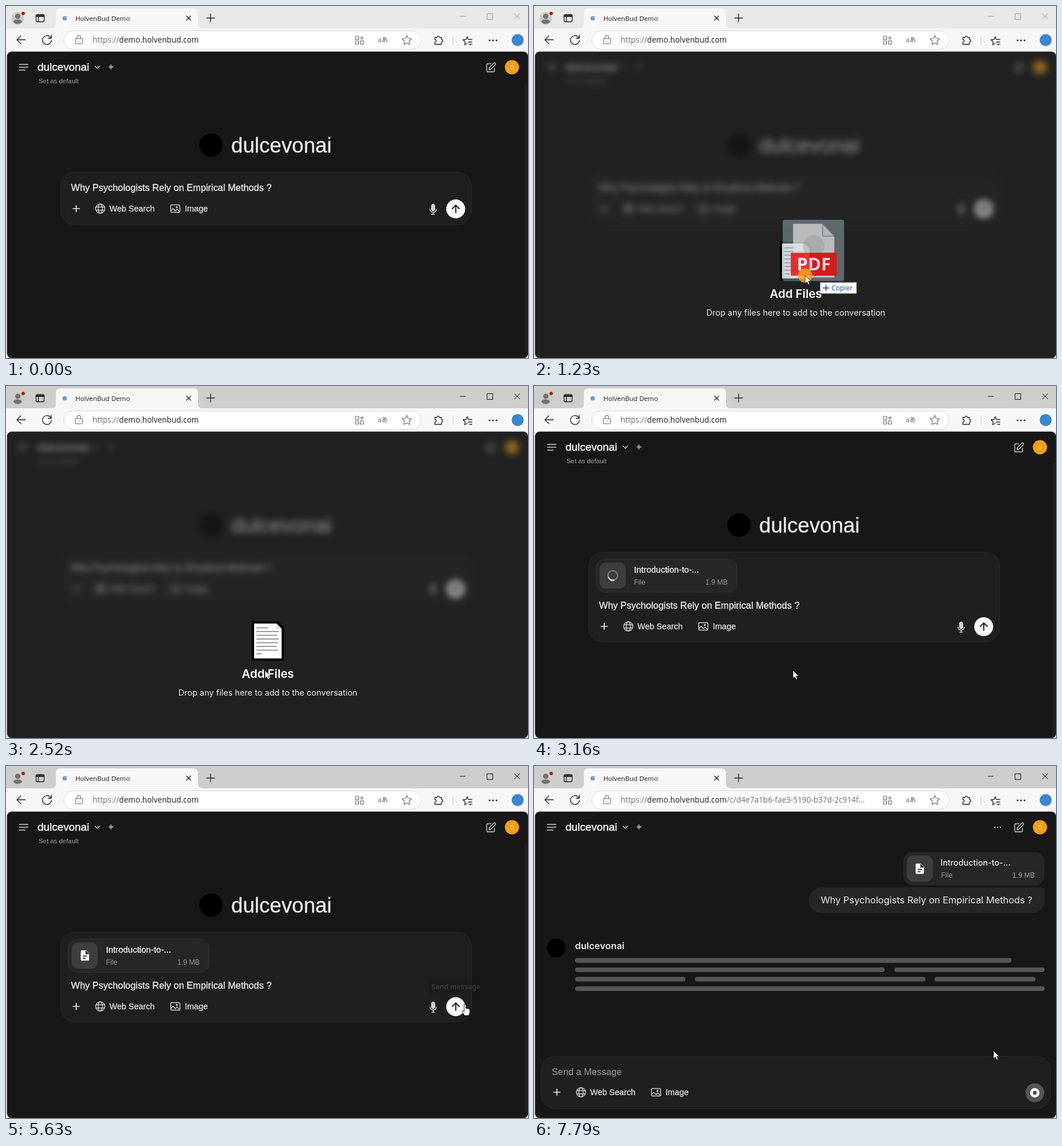
Recreate the animation shown at these times as an HTML page. Size 911 by 615 pixels, loop 8000 ms.

```html
<!DOCTYPE html>
<html lang="en">
<head>
<meta charset="utf-8">
<title>Chat file upload</title>
<style>
  html, body { margin: 0; width: 100%; height: 100%; overflow: hidden; background: #f7f7f7; }
  svg { display: block; width: 100%; height: 100%; }
  text { font-family: "Liberation Sans", Arial, sans-serif; fill: #ececec; white-space: pre; }
  .inter { font-family: Inter, sans-serif; }
  .ui { font-family: "Open Sans", "Noto Sans", sans-serif; fill: #1b1b1b; }
  .medium { stroke: #ececec; stroke-width: .35; }
  .strong { stroke: #ececec; stroke-width: .6; }
  .soft { fill: #d0d0d0; stroke: #d0d0d0; stroke-width: .45; }
  .muted { fill: #9b9b9b; }
  .line { fill: none; stroke: #d0d0d0; stroke-width: 1.4; stroke-linecap: round; stroke-linejoin: round; }
  .dark { stroke: #222; stroke-width: 1.3; }
  .grey { stroke: #666; stroke-width: 1.1; }
  .bright { stroke: #ececec; stroke-width: 1.7; }
  .panel { fill: #1f1f1f; stroke: #2a2a2a; }
</style>
</head>
<body>
<svg viewBox="0 0 911 615">
  <defs>
    <clipPath id="pageClip"><rect x="2" y="80" width="909" height="535" rx="8"/></clipPath>
    <g id="tools">
      <path class="line bright" d="M117 354h11M122.500 348.500v11"/>
      <g class="line" transform="translate(164.500 354)">
        <circle r="8"/><ellipse rx="3.700" ry="8"/><path d="M-7.400-2.700H7.400M-7.400 2.700H7.400"/>
      </g>
      <text class="soft" x="180.500" y="359" font-size="14.400">Web Search</text>
      <g class="line" transform="translate(295.500 354)">
        <rect x="-8" y="-6.500" width="16" height="13" rx="1.500"/>
        <path d="M-8 4l4-4 4 4 3-3 5 5"/><circle cx="2.500" cy="-2.500" r="1"/>
      </g>
      <text class="soft" x="312" y="359" font-size="14.500">Image</text>
    </g>
    <g id="card">
      <rect x=".5" y=".5" width="246" height="58" rx="16" fill="#262626"/>
      <rect x="6.500" y="6.500" width="45.500" height="45.500" rx="11" fill="#3d3d3d"/>
      <text class="muted" x="66.500" y="45" font-size="12.400">File</text>
      <text class="muted" x="230" y="45" font-size="12.300" text-anchor="end">1.9 MB</text>
    </g>
    <g id="doc">
      <path fill="#fff" d="M-5.500-9H2L7.500-3.500V7.500A1.500 1.500 0 0 1 6 9H-5.500A1.500 1.500 0 0 1-7 7.500v-15A1.500 1.500 0 0 1-5.500-9z"/>
      <path stroke="#3d3d3d" stroke-width="1.800" d="M-3.500 1H4M-3.500 5H1.500M2-8V-3H7"/>
    </g>
  </defs>

  <!-- browser frame -->
  <rect id="titleBar" width="911" height="40"/>
  <path fill="#f7f7f7" d="M0 39H79q8 0 8-8V12q0-8 8-8H327q8 0 8 8V31q0 8 8 8H911V90H0z"/>
  <circle cx="20.500" cy="21.500" r="11" fill="#cdcac7"/>
  <circle cx="20.500" cy="18" r="4.500" fill="#77706b"/>
  <path fill="#77706b" d="M13 28q0-4.500 7.500-4.500T28 28q-7.500 7-15 0z"/>
  <circle cx="30" cy="13" r="3" fill="#a3200d"/>
  <g class="line dark">
    <rect x="52.500" y="15" width="14" height="12.500" rx="2"/>
    <path d="M53 17.500H66" stroke-width="3"/><path d="M56.500 17V27"/>
    <path d="M315 17.500l7.500 7.500m0-7.500l-7.500 7.500M350 21H364M357 14V28"/>
    <path d="M34 59H19M26 52l-7 7 7 7"/>
    <path d="M78.500 56A7.800 7.800 0 1 0 79.300 60M79 51V56.500H73.500"/>
    <path d="M748.500 55h3.500a2.300 2.300 0 1 1 4.600 0H760V58.500a2.300 2.300 0 1 1 0 4.600V67H748.500V63a2.300 2.300 0 1 0 0-4.600z"/>
    <path d="M807 58.500l-2-5-2.300 5-5.200.5 4 3.700-1.200 5 4.700-2.500M808 58.500h5M807 63h6M809 67h4"/>
  </g>
  <circle cx="102.500" cy="21.500" r="4" fill="#7d9cc4"/>
  <text class="ui" x="121" y="25.500" font-size="11.600">HolvenBud Demo</text>
  <path id="winButtons" fill="none" d="M792 18H802M839.500 13.500h10v10h-10zM887 13l10 10m0-10l-10 10"/>
  <rect x="101" y="43.500" width="623.500" height="32" rx="16" fill="#fff" stroke="#d8d8d8"/>
  <g class="line grey">
    <rect x="121" y="57" width="12.500" height="9" rx="1.500"/><path d="M124 57V54.500a3.200 3.200 0 0 1 6.400 0V57M127.200 61v1"/>
    <path d="M610 53h5.500v5.500H610zM610 61h5.500v5.500H610zM618.500 61H624v5.500H618.500zM621 52.500v6.500M617.800 55.800h6.400"/>
    <path d="M699.500 51.500l2.500 5.300 5.600.7-4.100 4 1 5.700-5-2.800-5 2.800 1-5.700-4.100-4 5.600-.7z"/>
  </g>
  <text class="ui" x="649" y="63" font-size="11" style="font-family:'Noto Sans CJK JP','Noto Sans CJK',sans-serif;fill:#555">aあ</text>
  <path stroke="#ccc" d="M780 52V68"/>
  <g fill="#222"><circle cx="844" cy="60" r="1.500"/><circle cx="850" cy="60" r="1.500"/><circle cx="856" cy="60" r="1.500"/></g>
  <circle cx="893" cy="59.500" r="10.500" fill="#3b86d0"/>
  <text class="ui" x="151" y="64" font-size="13.600"><tspan fill="#6b6b6b">https://</tspan>demo.holvenbud.com<tspan id="urlPath" fill="#6b6b6b">/c/d4e7a1b6-fae3-5190-b37d-2c914f...</tspan></text>

  <!-- web page -->
  <rect x="1.500" y="79.500" width="910" height="536" rx="8.500" fill="none" stroke="#aaa"/>
  <g clip-path="url(#pageClip)">
    <rect x="2" y="80" width="909" height="535" fill="#171717"/>
    <g id="content">
      <path class="line" d="M23.500 102H38.500M23.500 107H38.500M23.500 112H33.500"/>
      <text class="strong" x="55" y="113" font-size="18.900">dulcevonai</text>
      <path class="line" d="M155.500 105l4 4 4-4M179.500 106.500h7.500M183.250 102.750v7.500"/>
      <g class="line" transform="translate(846 107)">
        <path d="M-.5-6H-5a2 2 0 0 0-2 2V6a2 2 0 0 0 2 2H4.500a2 2 0 0 0 2-2V1.500"/>
        <path d="M-3 4l.7-3.500 7.500-7.500a1.900 1.900 0 0 1 2.700 2.700L.4 3.300z"/>
      </g>
      <circle cx="883" cy="107" r="12.400" fill="#f59d12"/>
      <text class="inter" x="883" y="110.500" font-size="9.500" text-anchor="middle">D</text>

      <g id="home">
        <rect x="905" y="135" width="6" height="480" fill="#1e1e1e"/>
        <text class="muted" x="57" y="134.500" font-size="11.400">Set as default</text>
        <circle cx="358" cy="243" r="20.500"/>
        <text class="medium" x="393" y="256" font-size="36.700">dulcevonai</text>
        <rect id="composer" class="panel" x="95.500" y="290.500" width="717" rx="24"/>
        <g id="attachment">
          <use href="#card" x="108" y="302"/>
          <rect x="108.500" y="302.500" width="246" height="58" rx="16" fill="none" stroke="#323232"/>
          <text class="medium" x="174.500" y="326" font-size="15">Introduction-to-...</text>
          <use id="ready" href="#doc" x="137.500" y="331"/>
          <g id="spinner" fill="none" stroke-width="2.500">
            <circle r="8.300" stroke="#777"/><path stroke="#e8e8e8" d="M8.300 0A8.300 8.300 0 0 1 0 8.300"/>
          </g>
        </g>
        <g id="controls">
          <text class="medium" x="113.500" y="323" font-size="16.360">Why Psychologists Rely on Empirical Methods ?</text>
          <path id="caret" stroke="#ececec" d="M463.500 310V326.500"/>
          <use href="#tools"/>
          <g class="line" transform="translate(745.500 355)">
            <rect x="-2.800" y="-8.500" width="5.600" height="11.500" rx="2.800" fill="#d0d0d0"/>
            <path d="M-5.500 0a5.500 5.500 0 0 0 11 0M0 5.500V9M-2.500 9h5"/>
          </g>
          <circle cx="784.800" cy="354.500" r="16.500" fill="#fff"/>
          <path class="line dark" style="stroke-width:2" d="M785 361V348.500M779 354l6-6 6 6"/>
        </g>
        <g id="tooltip">
          <rect x="733" y="373" width="95" height="26" rx="6" fill="#0f0f0f"/>
          <text class="inter" x="785" y="390" font-size="12.300" text-anchor="middle">Send message</text>
        </g>
      </g>

      <g id="chat">
        <g fill="#d0d0d0"><circle cx="804" cy="107" r="1.300"/><circle cx="809" cy="107" r="1.300"/><circle cx="814" cy="107" r="1.300"/></g>
        <use href="#card" x="644" y="150"/>
        <use href="#doc" x="673" y="179.500"/>
        <text class="inter" x="709.500" y="174" font-size="14.300" font-weight="500">Introduction-to-...</text>
        <path fill="#262626" d="M502 212H885q6 0 6 6V235a22 22 0 0 1-22 22H502a22.500 22.500 0 0 1 0-45z"/>
        <text class="inter" x="500.500" y="240" font-size="16.360">Why Psychologists Rely on Empirical Methods ?</text>
        <circle cx="38.800" cy="317.800" r="16.400"/>
        <text class="inter" x="71.500" y="320" font-size="16.360" font-weight="600">dulcevonai</text>
        <path fill="none" stroke="#575757" stroke-width="8.200" stroke-linecap="round"
          d="M76 339.700H829M76 356H608M633 356H887M76 372.500H260M285 372.500H679M703 372.500H871M76 389H887"/>
        <rect class="panel" x="12.500" y="507.500" width="889" height="91" rx="24"/>
        <text class="muted" x="31" y="540" font-size="16.300">Send a Message</text>
        <use href="#tools" x="-82.500" y="216"/>
        <circle cx="874" cy="571" r="16.500" fill="#555"/>
        <circle cx="874" cy="571" r="8.300" fill="#fff"/>
        <rect x="871" y="568" width="6" height="6" rx="1" fill="#444"/>
      </g>
    </g>

    <g id="dropZone">
      <rect x="2" y="80" width="909" height="535" fill="#303030" opacity=".45"/>
      <path d="M429 411H475L485 421V480H429z"/>
      <path fill="#fff" d="M433 415H472L481 424V476H433z"/>
      <path fill="#ddd" d="M472 415V424H481z"/>
      <path stroke="#999" stroke-width="2" d="M437 422.500h20M437 429h39M437 435.500h36M437 442h39M437 448.500h38M437 455h35M437 461.500h38M437 468h9"/>
      <text class="inter" x="457" y="509.500" font-size="20.400" font-weight="600" text-anchor="middle" style="fill:#fff">Add Files</text>
      <text class="inter" x="457" y="541" font-size="14.500" text-anchor="middle">Drop any files here to add to the conversation</text>
    </g>
  </g>

  <!-- pointer and dragged file -->
  <g id="dragged">
    <g opacity=".9">
      <rect x=".5" y=".5" width="106" height="106" rx="2" fill="#9db0b9" fill-opacity=".55" stroke="#70899a" stroke-opacity=".7"/>
      <path fill="#dcdee0" fill-opacity=".85" d="M18 7H70L90 28V101H18z"/>
      <path fill="#c3c7ca" stroke="#5d676d" d="M69.500 7.500V28.500H90z"/>
      <circle cx="54" cy="46" r="19" fill="#b2b7bb" fill-opacity=".8"/>
      <rect x="14" y="57.500" width="80" height="40" fill="#e8181e"/>
      <text class="ui" x="54" y="88.500" font-size="31" font-weight="700" text-anchor="middle" style="fill:#f6eeee">PDF</text>
    </g>
    <rect x="65.500" y="109.500" width="63" height="19" fill="#fff" stroke="#aaa"/>
    <path stroke="#2444a0" stroke-width="1.600" d="M70 119h11M75.500 113.500v11"/>
    <text class="ui" x="85" y="123.500" font-size="12" style="fill:#2444a0">Copier</text>
  </g>
  <g id="pointer">
    <circle id="press" r="12.500" fill="#f9a514" opacity=".82"/>
    <path id="arrow" fill="#fff" stroke="#111" stroke-width=".8" d="M0 0V14L3.200 11 5.500 16 7.800 15 5.500 10H10z"/>
    <path id="hand" fill="#fff" stroke="#111" stroke-width=".9" d="M-1.500 0q1.500-1.500 3 0V6.500q1.500-1 2.500.5 1.500-.8 2.300.6Q8.500 7 8.500 9v5L6.500 19H-1L-5 12q0-2 1.500-1.500L-1.500 12z"/>
  </g>
</svg>
<script>
const LOOP = 8000, DRAG = 500, DROP = 2120, FOCUS = 2320, ATTACHED = 2610,
      UPLOADED = 4550, HOVER = 5450, CLICK = 6050, SENT = 6190, URL_CHANGE = 6400, BLINK = 530;

// each key: time, x, y
const filePath = [[800, 527, 303], [900, 512, 347], [1150, 445, 370], [1510, 397, 386],
  [1640, 397, 386], [1770, 397.5, 388], [1990, 397.5, 388], [2060, 399, 402]];
const pointerPath = [[800, 580, 398], [900, 537, 432], [1150, 480, 468], [1510, 450, 481],
  [1640, 450, 481], [1770, 450, 483], [1990, 450, 483], [2060, 452, 497],
  [3650, 452, 497], [3930, 543, 484], [4140, 654, 455], [4480, 719, 430],
  [5220, 719, 430], [5500, 801, 417], [SENT, 801, 417], [6500, 625, 377],
  [7600, 625, 377], [7790, 802, 497.5]];

const el = Object.fromEntries([...document.querySelectorAll('svg [id]')].map(e => [e.id, e]));
const show = (id, on) => { el[id].style.display = on ? '' : 'none'; };
const place = (id, [x, y], turn = 0) =>
  el[id].setAttribute('transform', `translate(${x} ${y}) rotate(${turn})`);
const clamp = v => Math.min(1, Math.max(0, v));

function along(path, t) {
  const next = path.findIndex(key => key[0] > t);
  if (next === 0) return path[0].slice(1);
  if (next < 0) return path[path.length - 1].slice(1);
  const [t0, x0, y0] = path[next - 1], [t1, x1, y1] = path[next];
  const k = (t - t0) / (t1 - t0);
  return [x0 + (x1 - x0) * k, y0 + (y1 - y0) * k];
}

function draw(now) {
  const t = now % LOOP;
  const active = t >= FOCUS, attached = t >= ATTACHED, sent = t >= SENT;
  const dropping = t >= DRAG && !attached;
  const dragging = t >= DRAG + 70 && t < DROP;
  const hovering = t >= HOVER && !sent;

  el.titleBar.setAttribute('fill', active ? '#cdcdcd' : '#e8e8e8');
  el.winButtons.setAttribute('stroke', active ? '#111' : '#999');
  show('urlPath', t >= URL_CHANGE);

  show('home', !sent);
  show('chat', sent);
  show('dropZone', dropping);
  el.content.style.filter = dropping ? 'blur(6px) brightness(.9)' : 'none';

  el.composer.setAttribute('height', attached ? 156.5 : 91.5);
  place('controls', [0, attached ? 66 : 0]);
  show('attachment', attached);
  show('ready', t >= UPLOADED);
  show('spinner', t < UPLOADED);
  place('spinner', [137.5, 331], 180 + (t - 4140) * 360 / 750);
  show('caret', attached && Math.floor((t - 3630) / BLINK) % 2 === 0);
  el.tooltip.style.opacity = clamp((t - 5580) / 300);

  show('dragged', dragging);
  place('dragged', along(filePath, t));
  show('pointer', t >= DRAG + 70);
  place('pointer', along(pointerPath, t));
  show('press', dragging || (t >= CLICK && !sent));
  show('arrow', !hovering);
  show('hand', hovering);
}

function tick() {
  draw(performance.now());
  requestAnimationFrame(tick);
}
tick();
</script>
</body>
</html>
```
